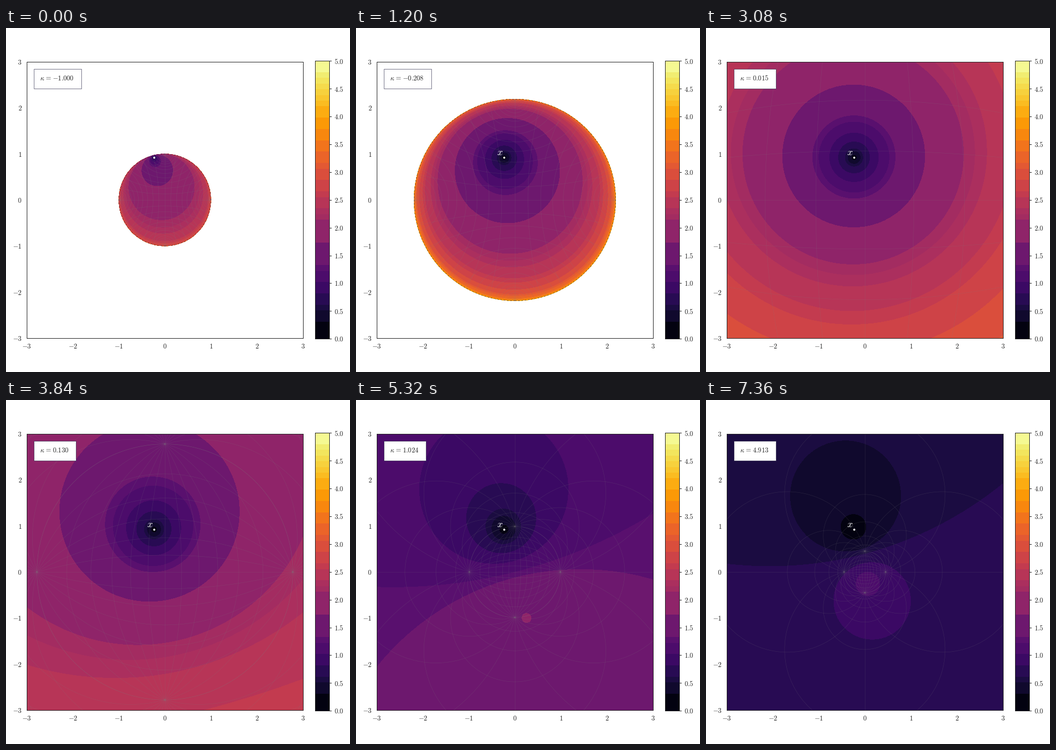
A matplotlib script that plays this animation: 630 px wide and 630 px high, repeating every 7400 ms.

```python
import numpy as np
import matplotlib.pyplot as plt
from matplotlib.animation import FuncAnimation
from matplotlib.collections import LineCollection
from matplotlib.patches import Circle, Rectangle

SIZE = 630
INK = "0.15"
POINT = np.array([-0.234, 0.922])
NORM2 = POINT @ POINT

# Colour bands, as edges on a scale of 49 equal steps from 0 to 5
STEPS = 49
EDGES = np.array([0, 3, 5, 6, 8, 10, 12, 13, 17, 21, 22, 23, 25, 26, 28, 30, 31,
                  33, 35, 37, 39, 41, 42, 43, 44, 45, 46, 47, 49])
LEVELS = EDGES * 5 / STEPS
COLORS = plt.get_cmap("inferno")((EDGES[:-1] + EDGES[1:]) / 2 / STEPS)

# Curvature runs along a cubic, skipping the almost flat cases
kappas = np.linspace(-1, 1.7, 200) ** 3
kappas = kappas[np.abs(kappas) > 1e-3]

plt.rcParams.update({
    "mathtext.fontset": "cm", "font.size": 10, "text.color": INK,
    "axes.edgecolor": INK, "axes.linewidth": 0.8,
    "xtick.color": INK, "ytick.color": INK,
})

fig = plt.figure(figsize=(7, 7), dpi=90, facecolor="white")


def px_axes(left, top, right, bottom):
    return fig.add_axes([left / SIZE, 1 - bottom / SIZE,
                         (right - left) / SIZE, (bottom - top) / SIZE])


def px_text(x, y, text, **style):
    return fig.text(x / SIZE, 1 - y / SIZE, text, **style)


ax = px_axes(37.9, 61.9, 543.9, 567.9)
ax.set(xlim=(-3, 3), ylim=(-3, 3))
ticks = range(-3, 4)
names = [f"${{{v}}}$" for v in ticks]
ax.set_xticks(ticks, names)
ax.set_yticks(ticks, names)
ax.tick_params(length=0, pad=7)

bar = px_axes(565.9, 60.2, 591.9, 569.2)
bar.bar(0.5, np.diff(LEVELS), width=1, bottom=LEVELS[:-1], color=COLORS)
bar.set(xlim=(0, 1), ylim=(0, 5), xticks=[])
values = np.arange(0, 5.1, 0.5)
bar.yaxis.tick_right()
bar.set_yticks(values, [f"${v:.1f}$" for v in values])
bar.tick_params(axis="y", length=3.5, pad=3.5, width=0.8)

discs = [ax.add_patch(Circle((0, 0), 1, lw=0, aa=False)) for _ in LEVELS[1:]]
rim = ax.add_patch(Circle((0, 0), 1, fill=False, ec="#1b1030", lw=0.4,
                          ls=(0, (6, 6)), zorder=2.2))
grid = ax.add_collection(LineCollection([], colors="gray", linewidths=0.5,
                                        alpha=0.22, zorder=2))
ax.plot(*POINT, "o", color="white", ms=3, mew=0, zorder=4)
px_text(258, 233, "$x$", color="white", fontsize=14)

box = fig.add_artist(Rectangle((50.9 / SIZE, 1 - 110.9 / SIZE), 0, 36 / SIZE,
                               transform=fig.transFigure, fc="white",
                               ec="#2a2848", lw=0.5))
label = px_text(62, 95.5, "")


def place_discs(k):
    """Sets of equal distance to POINT are circles."""
    root = np.sqrt(abs(k))
    fill = 0
    for j, (disc, level) in enumerate(zip(discs, LEVELS[1:])):
        half = root * level ** 2 / 2
        reachable = k < 0 or half < np.pi / 2
        disc.set_visible(reachable)
        if not reachable:
            continue
        t2 = ((np.tanh(half) if k < 0 else np.tan(half)) / root) ** 2
        a = 1 - t2 * k * k * NORM2
        center = POINT * (1 + k * t2) / a
        disc.set_center(center)
        disc.set_radius(np.sqrt(max(center @ center - (NORM2 - t2) / a, 0)))
        if a > 0:
            fill = j + 1
            disc.set_facecolor(COLORS[j])
            disc.set_zorder(1.9 - j / 100)
        else:
            disc.set_facecolor(COLORS[min(j + 1, len(COLORS) - 1)])
            disc.set_zorder(1.5 + j / 100)
    ax.set_facecolor("white" if k < 0 else COLORS[min(fill, len(COLORS) - 1)])


def geodesics(k, radius):
    """Geodesics crossing both axes at right angles, equally spaced."""
    if k < 0:
        m = np.tanh(np.pi / 24 * np.arange(-22, 23))[:, None]
        s = np.tanh(np.linspace(-3.7, 3.7, 161))
        den = 1 + m ** 2 * s ** 2
        u, v = m * (1 + s ** 2) / den, s * (1 - m ** 2) / den
    else:
        m = np.tan(np.pi / 24 * np.arange(1, 12))[:, None]
        t = np.linspace(-np.pi / 2, np.pi / 2, 401)
        den = np.cos(t) ** 2 + m ** 2 * np.sin(t) ** 2
        u = m * np.cos(2 * t) / den
        v = (1 + m ** 2) / 2 * np.sin(2 * t) / den
    lines = [*(radius * np.stack([u, v], -1)), *(radius * np.stack([v, u], -1))]
    if k > 0:
        lines += [np.array([[-3, 0], [3, 0]]), np.array([[0, -3], [0, 3]])]
    return lines


def update(i):
    k = kappas[i]
    radius = 1 / np.sqrt(abs(k))
    place_discs(k)
    grid.set_segments(geodesics(k, radius))
    rim.set_visible(k < 0)
    rim.set_radius(radius)
    box.set_width((87 if k < 0 else 77) / SIZE)
    label.set_text(rf"$\kappa\hspace{{0.08}} = \hspace{{0.08}}{{{k:.3f}}}$")
    return [*discs, grid, rim, box, label]


anim = FuncAnimation(fig, update, frames=len(kappas), interval=40,
                     repeat=True, repeat_delay=0)
plt.show()
```
